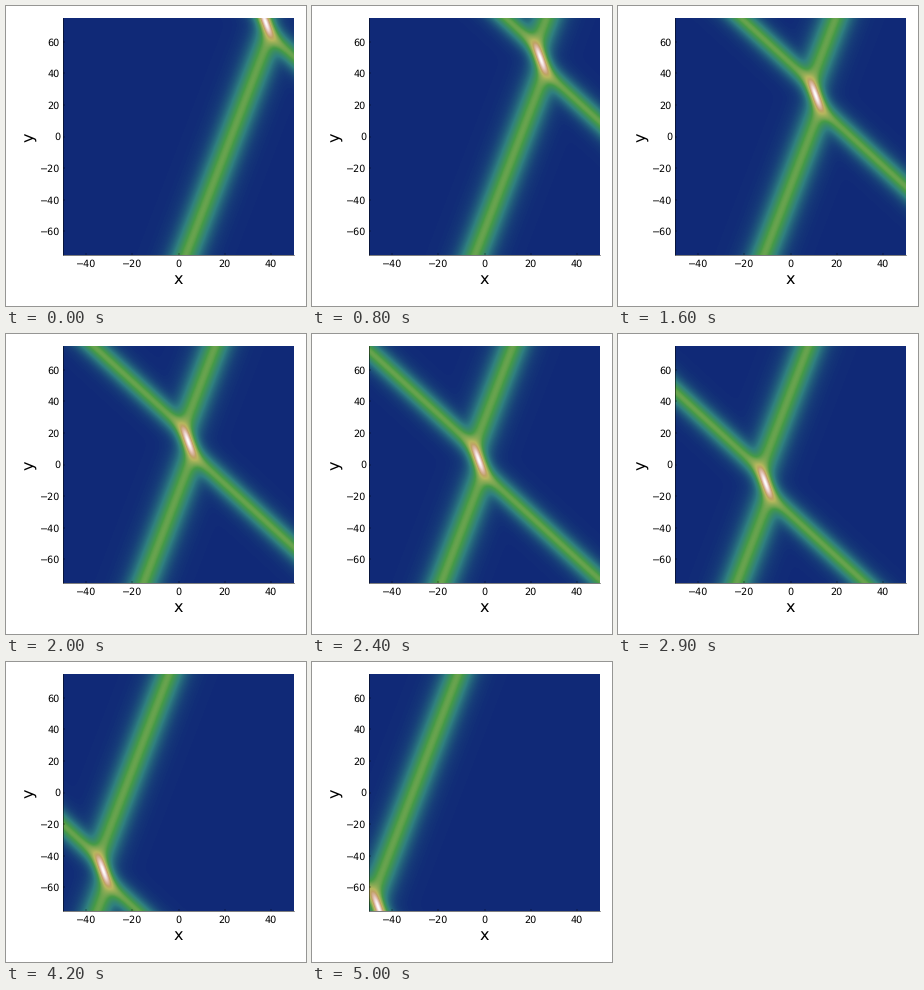
A matplotlib script for the animation above (5050 ms loop, 300 by 300 pixels).

```python
import numpy as np
import matplotlib.pyplot as plt
from matplotlib.animation import FuncAnimation

SIZE, DPI = 300, 100
FRAMES, STEP = 101, 50
PX = 72 / DPI  # one pixel in points

# Two line solitons of the KP equation with equal wave number
K = 0.5
SLOPE_A, SLOPE_B = -0.262, 0.746
GAP = SLOPE_B - SLOPE_A
COUPLING = GAP**2 / (GAP**2 - 4 * K**2)
PEAK = 2 * K**2 / (1 + COUPLING**-0.5)

XLIM, YLIM = (-50, 50), (-75, 75)
LEFT, RIGHT, TOP, BOTTOM = 57, 288, 12, 249


def centers(lo, hi, n):
    return lo + (np.arange(n) + 0.5) * (hi - lo) / n


X, Y = np.meshgrid(centers(*XLIM, RIGHT - LEFT), centers(*YLIM, BOTTOM - TOP))


def wave(slope, t):
    speed = K**2 + 3 * slope**2
    return np.exp(K * (X + slope * Y + speed * t))


def field(t):
    a, b = wave(SLOPE_A, t), wave(SLOPE_B, t)
    both = COUPLING * a * b
    tau = 1 + a + b + both
    d1 = K * (a + b + 2 * both) / tau
    d2 = K**2 * (a + b + 4 * both) / tau
    return 2 * np.maximum(d2 - d1**2, 0)


def shade(n):
    u = field(n - FRAMES // 2)
    return 0.1 + 0.9 * (u / PEAK) ** 0.6


plt.rcParams["font.family"] = "DejaVu Sans"
plt.rcParams["text.hinting"] = "none"
fig = plt.figure(figsize=(SIZE / DPI, SIZE / DPI), dpi=DPI, facecolor="white")
ax = fig.add_axes([LEFT / SIZE, 1 - BOTTOM / SIZE,
                   (RIGHT - LEFT) / SIZE, (BOTTOM - TOP) / SIZE])
image = ax.imshow(shade(0), cmap="gist_earth", vmin=0, vmax=1, origin="lower",
                  extent=(*XLIM, *YLIM), aspect="auto", interpolation="nearest")

ax.set_xticks(range(-40, 41, 20))
ax.set_yticks(range(-60, 61, 20))
ax.tick_params(direction="in", length=2 * PX, width=0.4 * PX, labelsize=9.6 * PX)
ax.tick_params(axis="x", pad=4 * PX)
ax.tick_params(axis="y", pad=3 * PX)
for side in ("top", "right"):
    ax.spines[side].set_visible(False)
for side in ("left", "bottom"):
    ax.spines[side].set_linewidth(0.5 * PX)

fig.text(172.5 / SIZE, 1 - 278 / SIZE, "x", size=16 * PX, ha="center", va="baseline")
fig.text(24 / SIZE, 1 - 131 / SIZE, "y", size=16 * PX, rotation=90,
         ha="center", va="center")


def update(n):
    image.set_data(shade(n))
    return (image,)


anim = FuncAnimation(fig, update, frames=FRAMES, interval=STEP,
                     repeat=True, repeat_delay=0, blit=False)
plt.show()
```
